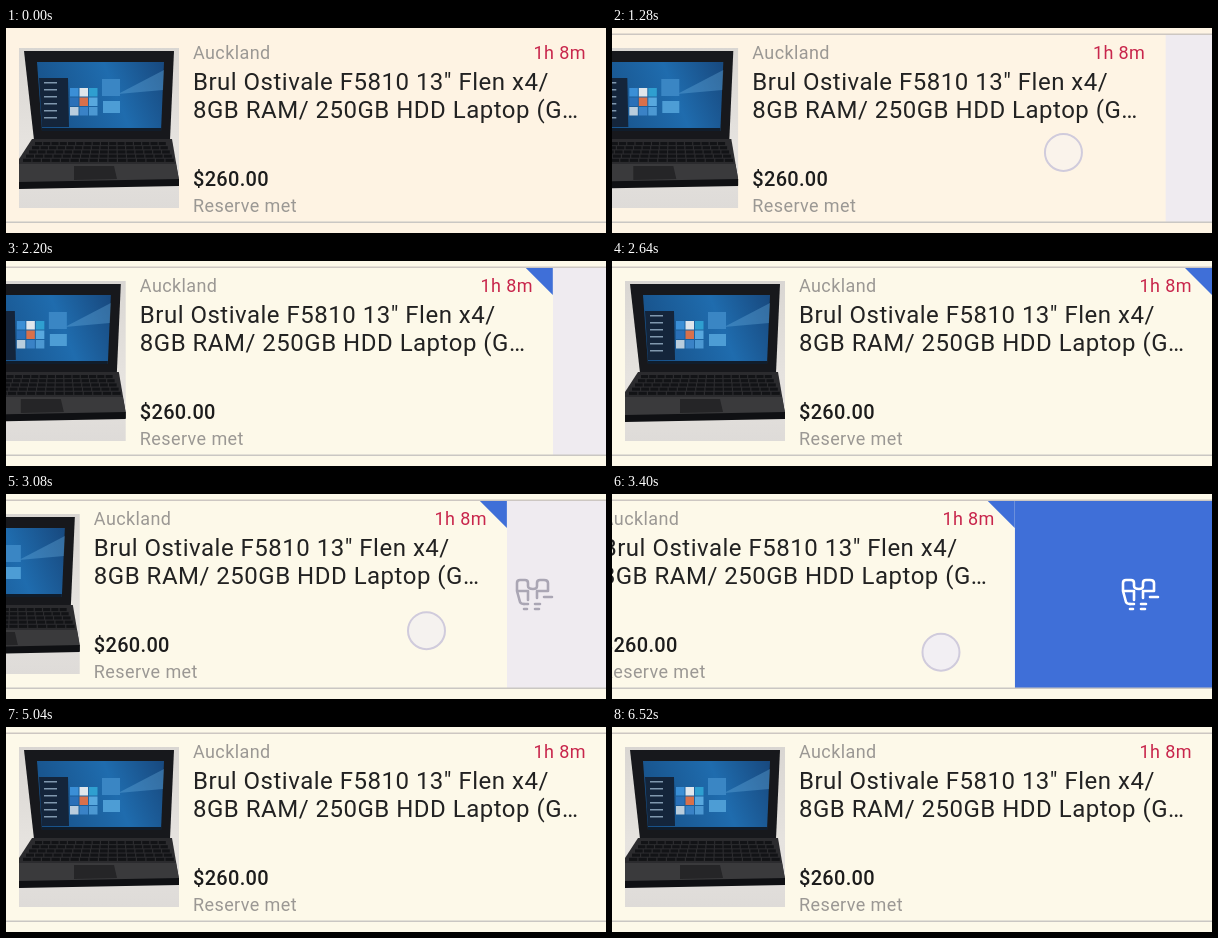
Animation of 600 by 205 pixels, one loop 6600 ms. Source, as an HTML page with a canvas:

```html
<!DOCTYPE html>
<html lang="en">
<head>
<meta charset="utf-8">
<title>Swipe to watch</title>
<style>
html, body { margin: 0; width: 100%; height: 100%; overflow: hidden; background: #fdf8e8; }
canvas { display: block; width: 600px; height: 205px; }
</style>
</head>
<body>
<canvas id="stage"></canvas>
<script>
const W = 600, H = 205, LOOP = 6600;
const TOP = 7, BOTTOM = 194;
const BLUE = '#3f6fd8', LAVENDER = '#efebf0';
const ICON = { x: 527, y: 100 };
const DRAG_MS = 690, RETURN_MS = 610;

const swipes = [
  { start: 1190, release: 1967, peak: 227, reveal: 1500, touchX: 495 },
  { start: 2865, release: 3642, peak: 210, reveal: 3130, touchX: 513 }
];

const canvas = document.getElementById('stage');
const ctx = canvas.getContext('2d');
const dpr = window.devicePixelRatio || 1;
canvas.width = W * dpr;
canvas.height = H * dpr;

const ramp = (t, from, to) => Math.min(1, Math.max(0, (t - from) / (to - from)));
const mix = (a, b, p) => a.map((v, i) => Math.round(v + (b[i] - v) * p));
const rgb = c => `rgb(${c.join(',')})`;

function rect(x, y, w, h, fill) {
  ctx.fillStyle = fill;
  ctx.fillRect(x, y, w, h);
}

function poly(fill, ...pts) {
  ctx.beginPath();
  for (let i = 0; i < pts.length; i += 2) ctx.lineTo(pts[i], pts[i + 1]);
  ctx.closePath();
  ctx.fillStyle = fill;
  ctx.fill();
}

function text(str, x, y, size, color, { weight = 400, spacing = 0.4, align = 'left' } = {}) {
  ctx.font = `${weight} ${size}px Roboto, sans-serif`;
  ctx.letterSpacing = spacing + 'px';
  ctx.textAlign = align;
  ctx.fillStyle = color;
  ctx.fillText(str, x, y);
}

// Card shift to the left and drag progress for one swipe
function dragOf(s, t) {
  const drag = Math.sin(ramp(t, s.start, s.start + DRAG_MS) * Math.PI / 2);
  const back = (1 - ramp(t, s.release, s.release + RETURN_MS)) ** 3;
  return { drag, shift: s.peak * drag * back };
}

function revealRadius(s, t) {
  const grown = Math.min(200, Math.max(0, (t - s.reveal) * 0.627));
  return grown * (1 - ramp(t, s.release + 60, s.release + 240));
}

function photo() {
  ctx.save();
  ctx.beginPath();
  ctx.rect(13, 20, 160, 160);
  ctx.clip();
  const wall = ctx.createLinearGradient(0, 20, 0, 180);
  wall.addColorStop(0, '#d9d6d2');
  wall.addColorStop(0.6, '#e6e3df');
  wall.addColorStop(1, '#dedbd8');
  rect(13, 20, 160, 160, wall);

  // lid and screen
  poly('#17181c', 18, 23, 168, 23, 164, 112, 28, 112);
  const screen = ctx.createLinearGradient(32, 90, 158, 40);
  screen.addColorStop(0, '#174f86');
  screen.addColorStop(0.6, '#1f6cae');
  screen.addColorStop(1, '#184a80');
  poly(screen, 31, 34, 158, 34, 155, 103, 36, 103);
  poly('rgba(120,190,235,0.3)', 112, 66, 158, 42, 157, 62);
  poly('#14253b', 33, 50, 62, 50, 63, 99, 36, 99);
  for (let i = 0; i < 6; i++) rect(38, 54 + i * 7, 13, 1.5, '#8098ae');
  const tiles = ['#3b8fd6', '#dfe6ec', '#2f9fd0', '#2a70b8', '#d9704a', '#58a8de', '#b9cddd', '#3a82c6', '#4c98d2'];
  tiles.forEach((c, i) => rect(64 + i % 3 * 9.5, 60 + Math.floor(i / 3) * 9.5, 8.5, 8.5, c));
  rect(96, 51, 18, 17, '#3a86c4');
  rect(97, 73, 17, 12, '#4d9dd5');
  rect(36, 100, 119, 3, '#101d2c');

  // hinge, keyboard and palm rest
  poly('#2b2b2e', 26, 111, 166, 111, 173, 152, 173, 157, 13, 160, 13, 131);
  for (let r = 0; r < 5; r++) {
    const y = 114 + r * 4.2, x = 29 - r * 3, w = 132 + r * 5;
    for (let k = 0; k < 16; k++) rect(x + k * w / 16, y, w / 16 - 1.2, 3.1, '#121316');
  }
  poly('#3a3a3c', 13, 136, 170, 136, 173, 152, 13, 155);
  poly('#252527', 68, 138, 108, 138, 111, 151, 68, 152);
  poly('#0f1013', 13, 154, 173, 151, 173, 158, 13, 161);
  ctx.restore();
}

function icon(color, watched) {
  ctx.save();
  ctx.translate(ICON.x, ICON.y);
  ctx.strokeStyle = color;
  ctx.lineWidth = 2.6;
  ctx.lineCap = ctx.lineJoin = 'round';
  ctx.stroke(new Path2D(
    'M-16-3 V-11 Q-16-14-13-14 H-8 Q-5-14-5-11 V-8 Q-5-5 0-5 Q4-5 4-8 V-11 Q4-14 7-14 H11 Q15-14 15-11 V-3' +
    ' M-16-3 H-6 M5-3 H15 M-16-3 L-13 8 Q-12 10-9 10 M-5-3 V6 M4-3 V4'));
  ctx.stroke(new Path2D(watched
    ? 'M11 3 H19 M-9 10 H-5 M2 10 H7 M-9 15 H-6 M2 15 H6'
    : 'M11 5 V17 M5 11 H17 M-9 15 H-3'));
  ctx.restore();
}

function actionPanel(shift, radius, watched) {
  ctx.save();
  ctx.beginPath();
  ctx.rect(W - shift, TOP, shift, BOTTOM - TOP);
  ctx.clip();
  rect(W - shift, TOP, shift, BOTTOM - TOP, LAVENDER);
  icon('#aaa6b4', watched);
  if (radius > 0) {
    ctx.beginPath();
    ctx.arc(ICON.x, ICON.y, radius, 0, Math.PI * 2);
    ctx.clip();
    rect(0, 0, W, H, BLUE);
    icon('#fff', watched);
  }
  ctx.restore();
}

function card(shift, paper, corner) {
  ctx.save();
  ctx.translate(-shift, 0);
  rect(0, TOP, W, BOTTOM - TOP, paper);
  photo();
  text('Auckland', 187, 31, 18, '#9b9894');
  text('1h 8m', 580, 31, 18, '#c8264c', { align: 'right' });
  text('Brul Ostivale F5810 13" Flen x4/', 187, 62, 24, '#222', { spacing: 0.5 });
  text('8GB RAM/ 250GB HDD Laptop (G…', 187, 90, 24, '#222', { spacing: 0.5 });
  text('$260.00', 187, 158, 20, '#1c1c1c', { weight: 500, spacing: 0.3 });
  text('Reserve met', 187, 184, 18, '#9b9894');
  if (corner > 0) poly(BLUE, W - 27 * corner, TOP, W, TOP, W, TOP + 27 * corner);
  ctx.restore();
}

function touch(s, t, drag, shift) {
  const alpha = ramp(t, s.start - 20, s.start + 80) * (1 - ramp(t, s.release, s.release + 140));
  if (!alpha) return;
  const x = s.touchX - 0.933 * s.peak * drag;
  const y = 115 + 46 * drag;
  ctx.save();
  ctx.globalAlpha = alpha;
  ctx.beginPath();
  ctx.arc(x, y, 18.5, 0, Math.PI * 2);
  ctx.fillStyle = `rgba(241,239,244,${0.25 + 0.65 * ramp(t, s.start, s.start + 400)})`;
  ctx.fill();
  ctx.lineWidth = 2;
  ctx.strokeStyle = '#d0cbdc';
  ctx.stroke();
  ctx.restore();
}

function draw(t) {
  const s = swipes[t < 2700 ? 0 : 1];
  const { drag, shift } = dragOf(s, t);
  const [add, remove] = swipes;
  const corner = ramp(t, add.release, add.release + 180) - ramp(t, remove.release, remove.release + 180);
  const watched = t > 2600 && t < 4300;
  const paper = rgb(mix([254, 243, 227], [253, 249, 233], ramp(t, 1180, 1600)));

  ctx.setTransform(dpr, 0, 0, dpr, 0, 0);
  rect(0, 0, W, H, paper);
  actionPanel(shift, revealRadius(s, t), watched);
  card(shift, paper, corner);
  ctx.globalAlpha = ramp(t, 1180, 1280);
  rect(0, 5.5, W, 1.5, '#cdc7c2');
  ctx.globalAlpha = 1;
  rect(0, 193.5, W, 1.5, '#cac7c3');
  touch(s, t, drag, shift);
}

const began = performance.now();
function frame() {
  draw((performance.now() - began) % LOOP);
  requestAnimationFrame(frame);
}
frame();
</script>
</body>
</html>
```
